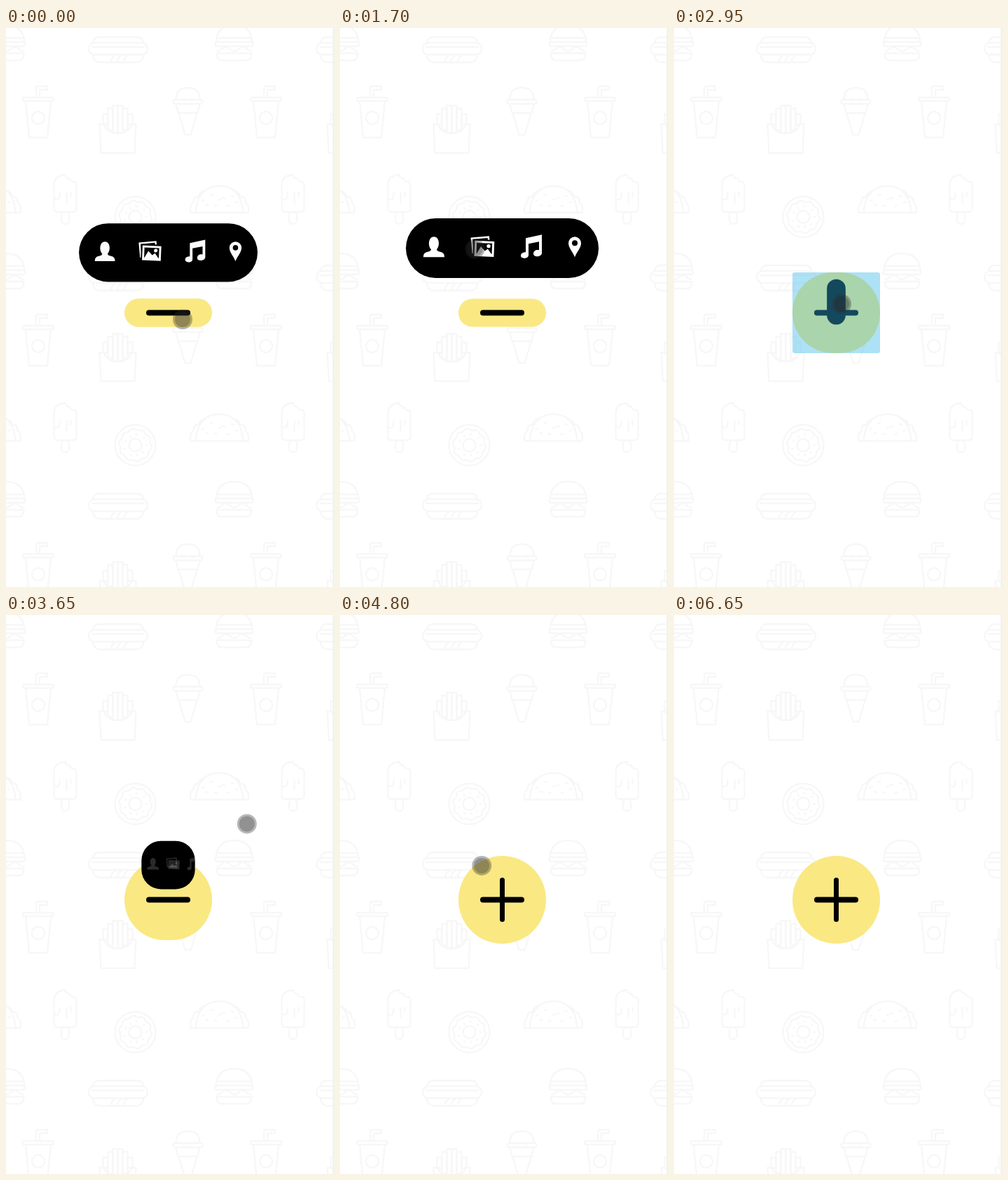
An HTML page with a canvas that plays this animation: 468 px wide and 796 px high, repeating every 6.7 s.

```html
<!DOCTYPE html>
<html lang="en">
<head>
<meta charset="utf-8">
<title>Plus menu</title>
<style>
html, body { margin: 0; width: 100%; height: 100%; overflow: hidden; background: #fff; }
canvas { display: block; }
</style>
</head>
<body>
<canvas id="stage" width="468" height="796"></canvas>
<script>
const W = 468, H = 796, LOOP = 6700, STEP = 50, TILE = 325;
const CX = 231.5, CY = 405.5, TAU = Math.PI * 2;
const ctx = document.getElementById('stage').getContext('2d');

const lerp = (a, b, p) => a + (b - a) * p;
const clamp = v => Math.max(0, Math.min(1, v));
const smooth = v => v * v * (3 - 2 * v);

// cubic-bezier(.25, .1, .25, 1)
function ease(x) {
  x = clamp(x);
  let lo = 0, hi = 1, s = x;
  for (let i = 0; i < 24; i++) {
    s = (lo + hi) / 2;
    if (0.75 * s * (1 - s) + s ** 3 < x) lo = s; else hi = s;
  }
  return 0.3 * s * (1 - s) ** 2 + 3 * s * s * (1 - s) + s ** 3;
}

function box(c, x, y, w, h, r) {
  c.beginPath();
  c.roundRect(x, y, w, h, Math.max(0, Math.min(r, w / 2, h / 2)));
}
function disc(c, x, y, r) {
  c.beginPath();
  c.arc(x, y, r, 0, TAU);
}
function at(c, x, y, paint) {
  c.save();
  c.translate(x, y);
  paint(c);
  c.restore();
}

// ---- wallpaper: line drawings around their own centres ----
const line = (c, d) => c.stroke(new Path2D(d));
const ring = (c, x, y, r) => { disc(c, x, y, r); c.stroke(); };
const frame = (c, ...b) => { box(c, ...b); c.stroke(); };
function mirror(c, d) {
  line(c, d);
  c.save();
  c.scale(-1, 1);
  line(c, d);
  c.restore();
}
function curve(c, n, point) {
  c.beginPath();
  for (let i = 0; i <= n; i++) c.lineTo(...point(i / n));
  c.stroke();
}

function hotdog(c) {
  mirror(c, 'M0 -18H27Q35 -18 36 -10M0 -4H37M0 18H25Q35 18 36 8');
  frame(c, -42, -10, 84, 17, 8);
  for (let x = -10; x <= 8; x += 9) line(c, `M${x} 16q1 -6 6 -8`);
}
function burger(c) {
  mirror(c, 'M0 -24Q24 -24 26 0M0 -6H25M0 16H25M0 26H18Q24 26 25 17');
  frame(c, -27, 0, 54, 6, 3);
  curve(c, 40, u => [lerp(-24, 24, u), 10 + 3 * Math.cos(u * 2 * TAU)]);
}
function cup(c) {
  mirror(c, 'M0 37H13L18 -15');
  frame(c, -22, -20, 44, 5, 2);
  ring(c, 0, 9, 9);
  line(c, 'M-3 -20V-33Q-3 -36 0 -36H13V-31H2V-20');
}
function fries(c) {
  mirror(c, 'M0 34H24L26 -7H20Q15 6 0 6');
  for (let i = -3; i < 3; i++) {
    const k = 2 * (i + 0.5) ** 2;
    frame(c, 7 * i, k - 34, 7, 40 - 2 * k, 0);
  }
}
function cone(c) {
  mirror(c, 'M0 -33Q17 -33 17 -16M17 -10L14 3H0M13 4L4 34H0M4 -15H8');
  frame(c, -21, -16, 42, 6, 3);
}
function popsicle(c) {
  line(c, 'M-16 13V-20Q-16 -34 0 -35Q1 -29 6 -30Q8 -24 14 -25Q17 -22 16 -16V13Q16 18 11 18H-11Q-16 18 -16 13Z');
  line(c, 'M-16 -1Q-9 3 -8 -5V-9M2 5V-9M8 -4V-10');
  frame(c, -5.5, 18, 11, 17, 5);
}
function taco(c) {
  mirror(c, 'M0 -19Q31 -19 34 19M0 19H41Q43 7 37 5Q38 -4 30 -4Q28 -11 20 -13');
  for (let i = 0; i < 9; i++) {
    line(c, `M${6 * i - 25} ${2 + 8 * Math.sin(i * 2.4)}l3 ${i % 2 ? 1 : -1}`);
  }
}
function donut(c) {
  ring(c, 0, 0, 29);
  ring(c, 0, 0, 9);
  curve(c, 90, u => {
    const r = 22.5 + 1.2 * Math.sin(u * TAU * 10);
    return [r * Math.cos(u * TAU), r * Math.sin(u * TAU)];
  });
  for (let i = 0; i < 9; i++) {
    const a = i / 9 * TAU;
    line(c, `M${15 * Math.cos(a)} ${15 * Math.sin(a)}l${2 * Math.cos(i * 2.3)} ${2 * Math.sin(i * 2.3)}`);
  }
}
const doodles = [
  [hotdog, 160, 31], [burger, 325.5, 20], [cup, 46, 119], [fries, 159.5, 144],
  [cone, 259.5, 118], [popsicle, 84.5, 244], [taco, 304.5, 244], [donut, 184.5, 269]
];

const paper = document.createElement('canvas');
paper.width = W;
paper.height = H;
(function paintPaper(c) {
  c.fillStyle = '#fff';
  c.fillRect(0, 0, W, H);
  c.strokeStyle = '#f7f7f7';
  c.lineWidth = 2.3;
  c.lineCap = c.lineJoin = 'round';
  for (let x = -TILE; x < W; x += TILE) {
    for (let y = 0; y < H; y += TILE) {
      for (const [paint, dx, dy] of doodles) at(c, x + dx, y + dy, paint);
    }
  }
  c.fillStyle = '#ebf4f5';
  c.fillRect(466, 0, 2, H);
})(paper.getContext('2d'));

// ---- menu icons, around their own centres ----
const body = new Path2D('M-4 4C-9 -1 -8 -14 0 -14S9 -1 4 4Q4 6 7 7C13 8 15 10 15 15H-15C-15 10 -13 8 -7 7Q-4 6 -4 4Z');
const note = new Path2D('M-8 -12L15 -17V9C15 15 3 16 3 10C3 6 7 4 11 5V-7L-4 -4V12C-4 18 -15 18 -15 13C-15 9 -11 8 -8 8Z');
const hills = new Path2D('M-9 11L-3 0L3 6L7 3L13 11Z');

function pin(c) {
  c.fill(new Path2D('M0 15C-3 7 -9 2 -9 -5A9 9 0 0 1 9 -5C9 2 3 7 0 15Z'));
  c.fillStyle = '#000';
  disc(c, 0, -5, 4);
  c.fill();
}
function photos(c) {
  const rect = (color, ...r) => { c.fillStyle = color; c.fillRect(...r); };
  c.rotate(-0.09);
  c.lineWidth = 2.5;
  c.strokeStyle = '#fff';
  c.strokeRect(-15, -13, 24, 20);
  c.rotate(0.13);
  rect('#000', -14, -10, 32, 26);
  rect('#fff', -12, -8, 28, 22);
  rect('#000', -9, -5, 22, 15);
  c.fillStyle = '#fff';
  c.fill(hills);
  disc(c, 8, -1, 2.7);
  c.fill();
}
const icons = [[40, c => c.fill(body)], [110, photos], [179, c => c.fill(note)], [241, pin]];

// ---- timeline: taps open and close the menu in turn ----
// go: travel time to the spot, bx/by: how far the way there bows out
const spot = (t, x, y, more) => ({ t, x, y, go: 450, bx: 0, by: 0, ...more });
const away = (t, more) => spot(t, 366, 276, more);
const stops = [
  spot(-180, 252, 415), away(250, { go: 250 }),
  spot(740, 252, 415), away(2300, { go: 1320, bx: -127, by: -22 }),
  spot(2927, 239, 393), away(3530),
  spot(3980, 239, 398), away(4360),
  spot(5050, 202, 357), away(5750),
  spot(6640, 240, 410, { go: 880, by: -160 })
];

function cursorAt(t) {
  const i = stops.findIndex(s => s.t > t);
  if (i < 1) return null;
  const a = stops[i - 1], b = stops[i];
  // leave at once after closing, wait on the button after opening
  const begin = i % 2 ? Math.max(a.t, b.t - b.go) : a.t;
  const p = smooth(clamp((t - begin) / Math.min(b.go, b.t - begin)));
  const bow = Math.sin(p * Math.PI);
  return [lerp(a.x, b.x, p) + b.bx * bow, lerp(a.y, b.y, p) + b.by * bow];
}

function stateAt(t) {
  const taps = stops.slice(0, -1);
  const i = taps.findLastIndex(s => s.t <= t);
  const open = i % 2 === 0, e = t - taps[i].t;
  const flip = v => open ? v : 1 - v;
  return {
    squash: flip(ease(e / 200)),
    grow: flip(ease(e / 270)),
    rise: open ? 1 - (1 - clamp(e / 230)) ** 1.75 : 1 - ease(e / 436),
    glow: open ? 0.4 * clamp((180 - e) / 140) : 0
  };
}

function paintMenu(s) {
  const w = lerp(7, 275, s.grow), h = lerp(63, 85, s.grow);
  const x = CX - w / 2, cy = lerp(CY, 313.5, s.rise);
  ctx.save();
  ctx.fillStyle = '#000';
  box(ctx, x, cy - h / 2, w, h, 20 + 30 * s.grow);
  ctx.fill();
  ctx.clip();
  ctx.globalAlpha = smooth(s.grow);
  const u = w / 275, spread = Math.max(u, 0.2 + 0.76 * u), k = 0.42 + 0.58 * s.grow;
  for (const [pos, paint] of icons) {
    at(ctx, x + pos * spread, cy - 2.2, c => {
      c.scale(k, k);
      c.fillStyle = '#fff';
      paint(c);
    });
  }
  ctx.restore();
}

function paint(t) {
  const s = stateAt(t), h = lerp(125, 40, s.squash);
  const fill = color => { ctx.fillStyle = color; ctx.fill(); };
  ctx.drawImage(paper, 0, 0);

  box(ctx, 169, CY - h / 2, 125, h, 63);
  fill('#fae883');
  box(ctx, 200, 401.5, 63, 8, 4);
  fill('#000');
  paintMenu(s);

  box(ctx, 169, CY - h / 2, 125, h, 3);
  fill(`rgba(51,181,229,${s.glow})`);

  const p = cursorAt(t);
  if (!p) return;
  disc(ctx, ...p, 14);
  fill('rgba(50,50,50,.35)');
  disc(ctx, ...p, 11);
  fill('rgba(30,30,30,.25)');
}

const start = performance.now();
function tick() {
  const t = (performance.now() - start) % LOOP;
  paint(Math.floor(t / STEP) * STEP);
  requestAnimationFrame(tick);
}
tick();
</script>
</body>
</html>
```
